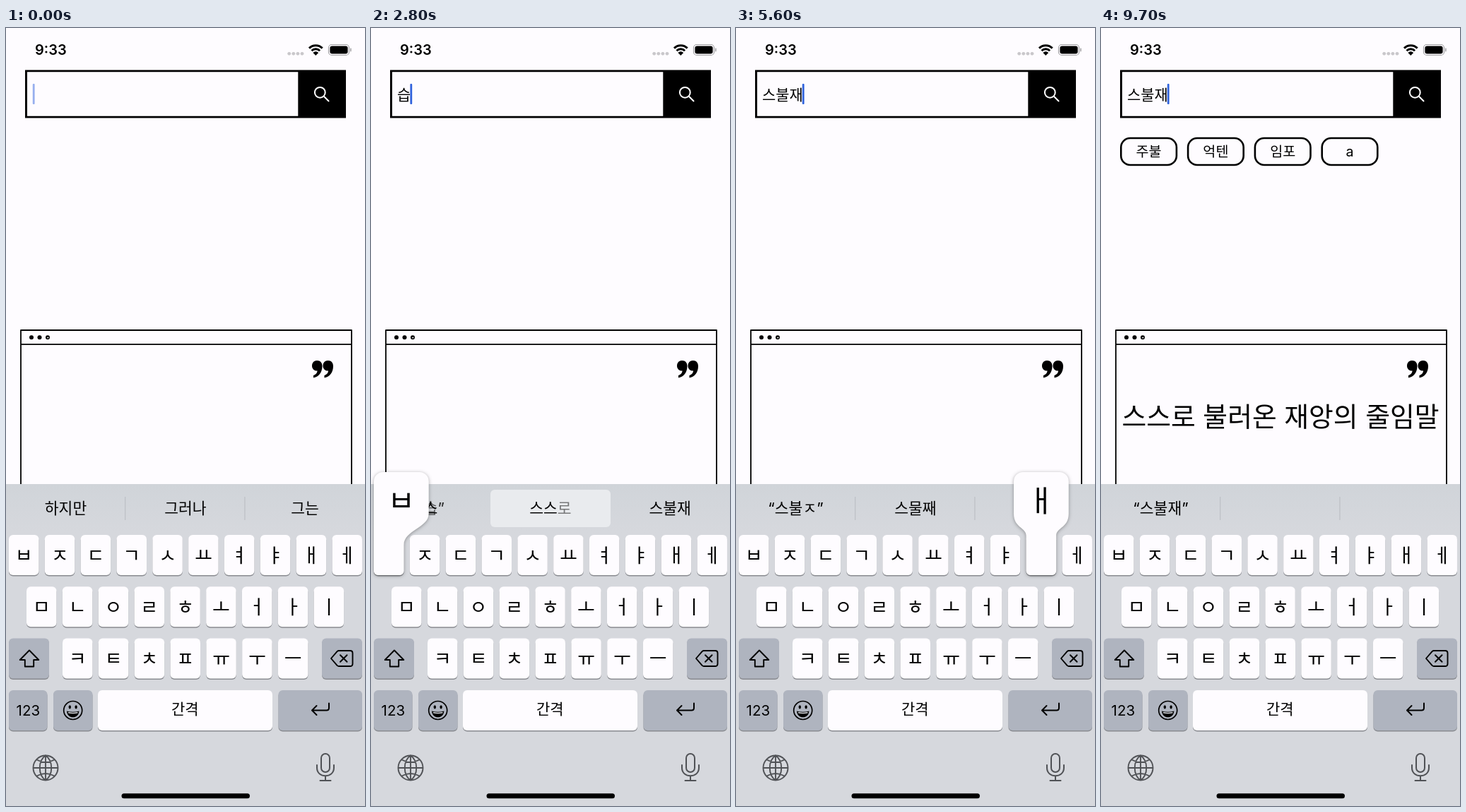
An HTML page with a canvas that plays this animation: 508 by 1102 pixels, repeating every 9800 ms.

```html
<!DOCTYPE html>
<html lang="ko">
<head>
<meta charset="utf-8">
<title>Search typing</title>
<style>
html, body { margin: 0; width: 100%; height: 100%; overflow: hidden; background: #fefcff; }
canvas { display: block; width: 508px; height: 1102px; }
</style>
</head>
<body>
<canvas id="stage" width="508" height="1102"></canvas>
<script>
const ctx = document.getElementById('stage').getContext('2d');
const LOOP = 9800;
const FONT = 'Inter, "Noto Sans CJK KR", "Noto Sans CJK", sans-serif';
const PAPER = '#fefcff', INK = '#000', GRAY = '#505256';
const ROWS = [
  { x: 4, y: 718, keys: 'ㅂㅈㄷㄱㅅㅛㅕㅑㅐㅔ' },
  { x: 29, y: 791.3, keys: 'ㅁㄴㅇㄹㅎㅗㅓㅏㅣ' },
  { x: 80, y: 864.5, keys: 'ㅋㅌㅊㅍㅠㅜㅡ' }
];
const PITCH = 50.83, KEY_W = 42.5, KEY_H = 57;

// [from, to, row, column]
const PRESSES = [
  [1250, 1400, 0, 4], [1900, 2050, 2, 6], [2700, 2900, 0, 0], [3250, 3400, 2, 5],
  [4100, 4250, 1, 3], [4600, 4800, 0, 1], [5600, 5700, 0, 8]
];
const TYPED = [
  [0, ''], [1250, 'ㅅ'], [1900, '스'], [2700, '습'], [3250, '스부'],
  [4100, '스불'], [4600, '스불ㅈ'], [5600, '스불재']
];
const SELECTED = [[3000, 3250], [3600, 3900]];
const HINTS = [
  { at: 0, words: ['하지만', '그러나', '그는'] },
  { at: 1240, words: ['“ㅅ”', '', ''] },
  { at: 2000, words: ['“스”', '스스로', '스불재'] },
  { at: 2700, words: ['“습”', '습니다', '스불재'], lit: true },
  { at: 3300, words: ['“스부”', '스무', '스불재'], lit: true },
  { at: 4200, words: ['“스불”', '스물', '스불재'] },
  { at: 4600, words: ['“스불ㅈ”', '스물째', ''] },
  { at: 5850, words: ['“스불재”', '', ''] }
];
// caret fades, alternately out and in
const BLINKS = [-100, 200, 850, 1200, 6100, 6500, 7050, 7450, 8100, 8500, 9100, 9500, 9700];
const RESULT_AT = 7200;

const clamp = v => Math.max(0, Math.min(1, v));
const within = (t, span) => t >= span[0] && t < span[1];

function setFont(size, weight = 400) {
  ctx.font = `${weight} ${size}px ${FONT}`;
}

function label(str, x, cy, size, { weight = 400, align = 'center', color = INK } = {}) {
  setFont(size, weight);
  ctx.textAlign = align;
  ctx.fillStyle = color;
  ctx.fillText(str, x, cy + size * 0.37);
}

function fillBox(x, y, w, h, r, color) {
  ctx.fillStyle = color;
  ctx.beginPath();
  ctx.roundRect(x, y, w, h, r);
  ctx.fill();
}

function strokeBox(x, y, w, h, r, width, color = INK) {
  ctx.strokeStyle = color;
  ctx.lineWidth = width;
  ctx.beginPath();
  ctx.roundRect(x, y, w, h, r);
  ctx.stroke();
}

function disc(x, y, r, color = INK) {
  ctx.fillStyle = color;
  ctx.beginPath();
  ctx.arc(x, y, r, 0, Math.PI * 2);
  ctx.fill();
}

function strokePath(d, width, color = INK) {
  ctx.strokeStyle = color;
  ctx.lineWidth = width;
  ctx.lineCap = ctx.lineJoin = 'round';
  ctx.stroke(new Path2D(d));
}

function fillPath(d, color = INK) {
  ctx.fillStyle = color;
  ctx.fill(new Path2D(d));
}

function drawStatus() {
  label('9:33', 41, 31, 20, { weight: 600, align: 'left' });
  for (let i = 0; i < 4; i++) disc(400.7 + i * 6.1, 36.3, 2.4, '#c9c7cb');
  ctx.strokeStyle = INK;
  ctx.lineCap = 'butt';
  ctx.lineWidth = 3;
  for (const r of [13.2, 8.2]) {
    ctx.beginPath();
    ctx.arc(438.3, 38, r, -Math.PI * 0.75, -Math.PI * 0.25);
    ctx.stroke();
  }
  fillPath('M438.3 39 L434.4 35 Q438.3 31.6 442.2 35 Z');
  strokeBox(456.5, 23.5, 29, 15, 4.5, 1.2, '#a3a2a5');
  fillBox(458.4, 25.4, 25.2, 11.2, 3, INK);
  fillBox(487, 28.5, 1.6, 5, 1, '#a3a2a5');
}

function caretAlpha(t) {
  if (t >= 1250 && t < 6100) return 1;
  let i = BLINKS.length - 1;
  while (BLINKS[i] > t) i--;
  if (BLINKS[i] === 1200) return 0;
  const k = clamp((t - BLINKS[i]) / 200);
  return i % 2 ? k : 1 - k;
}

function drawSearch(t) {
  fillBox(27, 59.5, 454, 68, 0, INK);
  fillBox(30, 62.3, 383.3, 62.4, 0, PAPER);
  ctx.strokeStyle = '#fff';
  ctx.lineWidth = 2;
  ctx.beginPath();
  ctx.arc(444.3, 91.3, 7.4, 0, Math.PI * 2);
  ctx.stroke();
  strokePath('M449.8 96.8 L456.5 103.5', 2, '#fff');

  const text = TYPED.findLast(s => s[0] <= t)[1];
  const end = 37 + 19.2 * text.length;
  if (SELECTED.some(s => within(t, s))) fillBox(35, 78, end - 34, 31, 0, '#cbdff2');
  label(text, 37, 94, 20.9, { weight: 500, align: 'left' });
  ctx.globalAlpha = caretAlpha(t);
  fillBox(text ? end - 0.8 : 37.8, 79, 2.8, 29, 1, '#2f62dc');
  ctx.globalAlpha = 1;
}

function drawCard(t) {
  strokeBox(21, 428, 468, 260, 0, 1.8);
  fillBox(21, 447.2, 468, 1.8, 0, INK);
  for (const x of [36, 47.5, 59]) disc(x, 438.3, 3);
  fillBox(58, 438, 2.5, 1.3, 0, '#ddd');
  for (const x of [433, 448.5]) {
    fillPath(`M${x + 7} 471 C${x + 12} 471 ${x + 14.5} 474.5 ${x + 14.5} 479
      C${x + 14.5} 488 ${x + 9} 494.5 ${x + 2} 495.5 L${x + 2} 492
      C${x + 6} 490.5 ${x + 7.5} 488 ${x + 7.5} 485.5
      C${x + 3} 486 ${x} 482.5 ${x} 478.5 C${x} 474 ${x + 3} 471 ${x + 7} 471 Z`);
  }
  if (t < RESULT_AT) return;
  ['주불', '억텐', '임포', 'a'].forEach((tag, i) => {
    const x = 28.3 + i * 94.8;
    strokeBox(x, 156, 78.6, 38, 13, 2.6);
    label(tag, x + 39.3, 175, 19.6);
  });
  label('스스로 불러온 재앙의 줄임말', 254, 550, 37.8);
}

function spread(word, cx, alphaOf) {
  setFont(21.5);
  ctx.textAlign = 'left';
  ctx.fillStyle = INK;
  const widths = [...word].map(c => ctx.measureText(c).width);
  let x = cx - widths.reduce((a, b) => a + b, 0) / 2;
  widths.forEach((w, i) => {
    ctx.globalAlpha = alphaOf(i);
    ctx.fillText(word[i], x, 688);
    x += w;
  });
  ctx.globalAlpha = 1;
}

function drawHints(t) {
  const i = HINTS.findLastIndex(h => h.at <= t);
  const now = HINTS[i], before = HINTS[i - 1] || now, dt = t - now.at;
  if (now.lit) fillBox(169, 654, 170, 53, 6, '#e9ebee');
  else for (const x of [168, 337.3]) fillBox(x, 664, 1.3, 33, 0, '#bec1c7');
  now.words.forEach((word, slot) => {
    const old = before.words[slot], cx = 84.5 + slot * 169.3;
    if (word === old) return spread(word, cx, () => 1);
    spread(old, cx, j => 1 - clamp((dt - 100 * (old.length - 1 - j)) / 200));
    spread(word, cx, j => slot ? clamp((dt - 250 - 60 * j) / 150) : clamp((dt - 40) / 110));
  });
}

function drawKey(x, y, w, color = PAPER) {
  fillBox(x, y + 1.4, w, KEY_H, 6, '#898b90');
  fillBox(x, y, w, KEY_H, 6, color);
}

function drawIcons() {
  strokePath('M33 881.5 L19.7 895 H26.8 V904.5 H39.2 V895 H46.3 Z', 1.9);
  strokePath('M460 893 L468.5 883.2 Q469.7 882 471 882 H487 Q490.5 882 490.5 885.5 V900.5 Q490.5 904 487 904 H471 Q469.7 904 468.5 902.8 Z', 1.9);
  strokePath('M473 888.2 L482.5 897.8 M482.5 888.2 L473 897.8', 2);
  strokePath('M457 956.5 V963 Q457 966.5 453.5 966.5 H433.5 M439.5 960 L433 966.5 L439.5 973', 2);

  strokePath('M81.7 966.5 A13 13 0 1 1 107.7 966.5 A13 13 0 1 1 81.7 966.5', 1.7);
  for (const x of [90.3, 99.1]) {
    ctx.fillStyle = INK;
    ctx.beginPath();
    ctx.ellipse(x, 961.8, 1.7, 2.6, 0, 0, Math.PI * 2);
    ctx.fill();
  }
  fillPath('M86 967.5 Q94.7 970 103.4 967.5 C103 973 99.5 976.3 94.7 976.3 C90 976.3 86.4 973 86 967.5 Z');
  strokePath('M88.5 969.7 Q94.7 971.2 101 969.7', 1.4, '#d6d8dd');

  strokePath(`M38.5 1048 A17.5 17.5 0 1 1 73.5 1048 A17.5 17.5 0 1 1 38.5 1048 H73.5
    M56 1030.5 V1065.5 M56 1030.5 C45 1038 45 1058 56 1065.5 C67 1058 67 1038 56 1030.5
    M43.5 1036.5 Q56 1043.5 68.5 1036.5 M43.5 1059.5 Q56 1052.5 68.5 1059.5`, 1.9, GRAY);

  strokeBox(446, 1028, 12, 26, 6, 2, GRAY);
  strokePath('M440 1044 V1048 C440 1063 464 1063 464 1048 V1044 M452 1059.5 V1066 M444.5 1066 H459.5', 2, GRAY);
}

function drawKeyboard(t) {
  fillBox(0, 646, 508, 456, 0, '#d6d8dd');
  const shade = ctx.createLinearGradient(0, 646, 0, 716);
  shade.addColorStop(0, '#d0d4d9');
  shade.addColorStop(1, '#d6d8dd');
  fillBox(0, 646, 508, 70, 0, shade);
  drawHints(t);
  for (const row of ROWS) {
    [...row.keys].forEach((key, i) => {
      const x = row.x + i * PITCH;
      drawKey(x, row.y, KEY_W);
      label(key, x + KEY_W / 2, row.y + 29, 27, { weight: 500 });
    });
  }
  const dark = '#afb4bf';
  drawKey(4, 864.5, 57, dark);
  drawKey(447, 864.5, 57, dark);
  drawKey(4, 938, 54.5, dark);
  drawKey(67, 938, 55.5, dark);
  drawKey(130, 938, 247, PAPER);
  drawKey(385.5, 938, 118.5, dark);
  label('123', 31.3, 966.5, 20.5);
  label('간격', 253.3, 964.5, 21);
  drawIcons();
  fillBox(163.5, 1084.3, 181.5, 7, 3.5, INK);
}

function drawPopup(rowIndex, col) {
  const row = ROWS[rowIndex], y = row.y;
  const x = row.x + col * PITCH, x2 = x + KEY_W;
  const edge = rowIndex === 0 && col === 0;
  const dl = edge ? 0 : 17.6, dr = edge ? 35.2 : 17.6;
  const left = x - dl, right = x2 + dr, top = y - 89, r = 13;
  const neck = d => y - 12 + d * 0.75;
  ctx.beginPath();
  ctx.moveTo(left, top + r);
  ctx.arcTo(left, top, left + r, top, r);
  ctx.arcTo(right, top, right, top + r, r);
  ctx.lineTo(right, y - 30);
  ctx.bezierCurveTo(right, y - 10, x2, y - 14 + dr * 0.2, x2, neck(dr));
  ctx.arcTo(x2, y + KEY_H, x, y + KEY_H, 6);
  ctx.arcTo(x, y + KEY_H, x, y, 6);
  ctx.lineTo(x, neck(dl));
  ctx.bezierCurveTo(x, y - 14 + dl * 0.2, left, y - 10, left, y - 30);
  ctx.closePath();
  ctx.save();
  ctx.shadowColor = 'rgba(0,0,0,.35)';
  ctx.shadowBlur = 5;
  ctx.shadowOffsetY = 1;
  ctx.fillStyle = PAPER;
  ctx.fill();
  ctx.restore();
  label(row.keys[col], (left + right) / 2, y - 49, 42);
}

function draw(t) {
  fillBox(0, 0, 508, 1102, 0, PAPER);
  drawStatus();
  drawSearch(t);
  drawCard(t);
  drawKeyboard(t);
  for (const [from, to, row, col] of PRESSES) {
    if (within(t, [from, to])) drawPopup(row, col);
  }
}

const start = performance.now();
function tick() {
  draw((performance.now() - start) % LOOP);
  requestAnimationFrame(tick);
}
tick();
</script>
</body>
</html>
```
